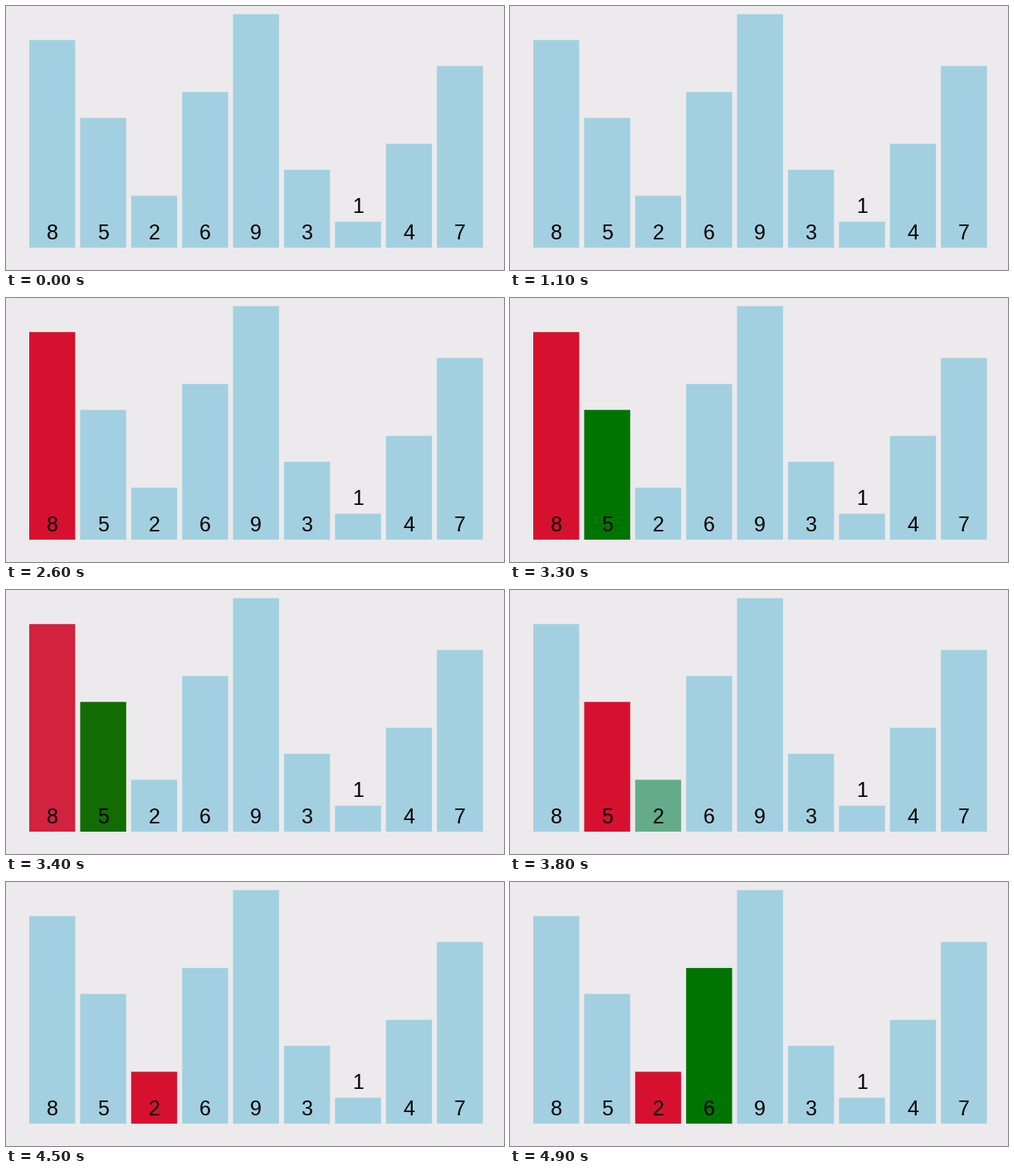
Animation of 600x319 px, one loop 5 s. Source, as a matplotlib script:

```python
import numpy as np
import matplotlib.pyplot as plt
from matplotlib.animation import FuncAnimation
from matplotlib.patches import Rectangle

W, H, DPI = 600, 319, 100
FRAMES, STEP = 50, 100

VALUES = [8, 5, 2, 6, 9, 3, 1, 4, 7]
LEFT, PITCH, BAR_W = 28, 61.4, 55.4
BASE, UNIT = 292, 31.35

BACK = np.array([236, 234, 236]) / 255
BLUE = np.array([163, 208, 224]) / 255
RED = np.array([214, 17, 48]) / 255
GREEN = np.array([0, 116, 0]) / 255

# Colour changes per bar: (start ms, end ms, new colour)
FADES = {
    0: [(2220, 2580, RED), (3370, 3700, BLUE)],
    1: [(2850, 3200, GREEN), (3370, 3700, RED), (4050, 4430, BLUE)],
    2: [(3680, 3990, GREEN), (4050, 4430, RED)],
    3: [(4620, 4900, GREEN)],
}

plt.rcParams["font.family"] = "Liberation Sans"
fig = plt.figure(figsize=(W / DPI, H / DPI), dpi=DPI, facecolor=BACK)
ax = fig.add_axes([0, 0, 1, 1])
ax.set_xlim(0, W)
ax.set_ylim(H, 0)
ax.axis("off")

bars = []
for i, value in enumerate(VALUES):
    x = LEFT + i * PITCH
    height = value * UNIT
    bar = Rectangle((x, BASE - height), BAR_W, height,
                    facecolor=BLUE, linewidth=0, snap=False)
    bars.append(ax.add_patch(bar))
    label_y = 250.5 if value == 1 else 282
    ax.text(x + BAR_W / 2, label_y, str(value), fontsize=18, color="black",
            ha="center", va="baseline")


def bar_color(i, ms):
    color = BLUE
    for start, end, new in FADES.get(i, []):
        k = np.clip((ms - start) / (end - start), 0, 1)
        color = color + (new - color) * k
    return color


def draw(frame):
    for i, bar in enumerate(bars):
        bar.set_facecolor(bar_color(i, frame * STEP))
    return bars


anim = FuncAnimation(fig, draw, frames=FRAMES, interval=STEP,
                     repeat=True, repeat_delay=0, blit=False)
plt.show()
```
